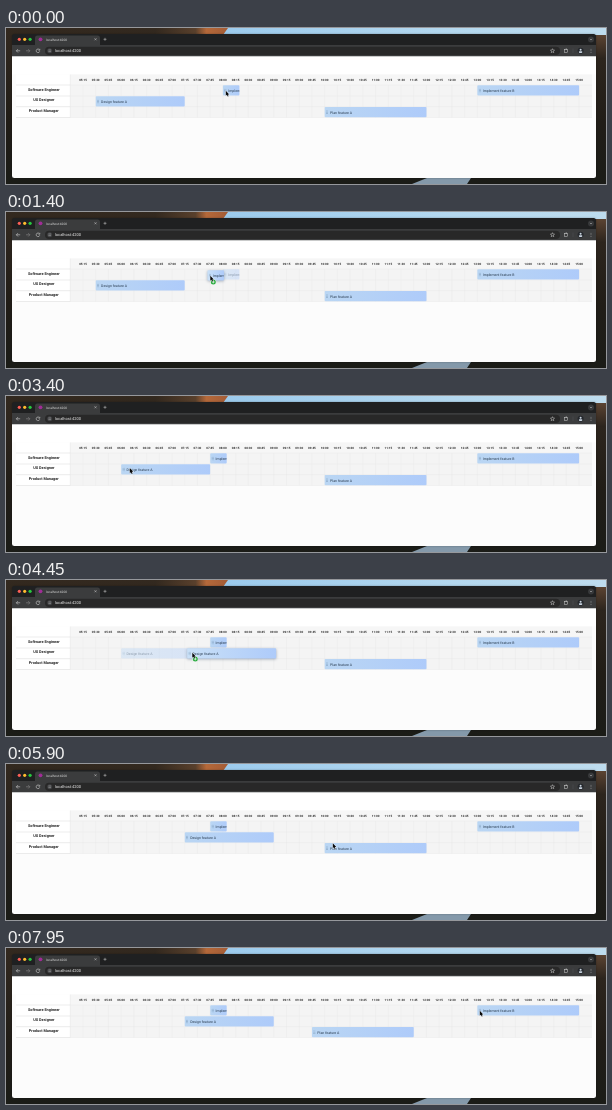
An HTML page with a canvas that plays this animation: 600 by 156 pixels, repeating every 8000 ms.

```html
<!DOCTYPE html>
<html lang="en">
<head>
<meta charset="utf-8">
<title>Schedule board</title>
<style>
html, body { margin: 0; width: 100%; height: 100%; overflow: hidden; background: #1c1a1c; }
canvas { display: block; width: 600px; height: 156px; }
</style>
</head>
<body>
<canvas id="stage"></canvas>
<script>
const W = 600, H = 156, LOOP = 8000;
const canvas = document.getElementById('stage');
const dpr = window.devicePixelRatio || 1;
canvas.width = W * dpr;
canvas.height = H * dpr;
const ctx = canvas.getContext('2d');
ctx.textRendering = 'geometricPrecision';

const STEP = 12.72, FIRST = 77;       // one column is a quarter of an hour
const ROWS = [57, 68, 78.7, 89.5];
const slot = n => FIRST + n * STEP;

// Drags: task, start, end, drop time, old and new slot, travel of the ghost
const DRAGS = [
  { task: 0, from: 650, to: 1400, drop: 1750, a: 11, b: 10, dx: -15.5, dy: 1 },
  { task: 1, from: 2550, to: 3000, drop: 3100, a: 1, b: 3, dx: 25, dy: 0.3 },
  { task: 1, from: 3750, to: 4430, drop: 4750, a: 3, b: 8, dx: 66, dy: 0 },
  { task: 2, from: 6050, to: 6450, drop: 6550, a: 19, b: 18, dx: -13, dy: 0 }
];
const TASKS = [
  { text: 'Implement feature A', row: 0, at: 11, w: 16.5 },
  { text: 'Design feature A', row: 1, at: 1, w: 89 },
  { text: 'Plan feature A', row: 2, at: 19, w: 101.8 },
  { text: 'Implement feature B', row: 0, at: 31, w: 101.8 }
];
// Pointer path: time, x, y
const PATH = [
  [0, 220.5, 65], [650, 220.5, 65], [1400, 205, 66], [1850, 205, 66],
  [2350, 99.5, 74], [2550, 99.5, 74], [3000, 124.5, 74.3], [3450, 124.5, 74.3],
  [3650, 121, 75], [3750, 121, 75], [4430, 187, 75], [4850, 187, 75],
  [5650, 327.5, 81.5], [5900, 327.5, 81.5], [6050, 321, 83], [6450, 308, 83],
  [6950, 308, 83], [7700, 474.5, 65], [8000, 474.5, 65]
];

const ease = p => p * p * (3 - 2 * p);
const clamp = p => Math.max(0, Math.min(1, p));

function pointer(t) {
  let i = 0;
  while (i < PATH.length - 2 && t >= PATH[i + 1][0]) i++;
  const [t0, x0, y0] = PATH[i], [t1, x1, y1] = PATH[i + 1];
  const p = ease(clamp((t - t0) / (t1 - t0)));
  return [x0 + (x1 - x0) * p, y0 + (y1 - y0) * p];
}

function rect(x, y, w, h, color, r = 0) {
  ctx.fillStyle = color;
  ctx.beginPath();
  ctx.roundRect(x, y, w, h, r);
  ctx.fill();
}

function polygon(points, color) {
  ctx.fillStyle = color;
  ctx.beginPath();
  points.forEach(([x, y]) => ctx.lineTo(x, y));
  ctx.fill();
}

function dot(x, y, r, color) {
  ctx.fillStyle = color;
  ctx.beginPath();
  ctx.arc(x, y, r, 0, 7);
  ctx.fill();
}

function line(points, color, width = 0.6) {
  ctx.strokeStyle = color;
  ctx.lineWidth = width;
  ctx.beginPath();
  points.forEach(([x, y], i) => i ? ctx.lineTo(x, y) : ctx.moveTo(x, y));
  ctx.stroke();
}

function label(text, x, y, size, color, weight = 400, align = 'left') {
  ctx.font = `${weight} ${size}px Roboto, sans-serif`;
  ctx.fillStyle = color;
  ctx.textAlign = align;
  ctx.textBaseline = 'alphabetic';
  ctx.fillText(text, x, y);
}

function gradient(x0, y0, x1, y1, stops) {
  const g = ctx.createLinearGradient(x0, y0, x1, y1);
  stops.forEach(([p, c]) => g.addColorStop(p, c));
  return g;
}

// Dark cliffs below a pale sky, with a patch of water at the bottom
function desktop() {
  rect(0, 0, W, H, gradient(0, 0, 0, H, [
    [0, '#33291f'], [0.25, '#2b241d'], [0.6, '#211d17'], [1, '#1b1c17']
  ]));
  rect(150, 0, 72, 7, gradient(150, 0, 222, 0, [
    [0, '#33291f'], [0.55, '#59402c'], [0.7, '#b5693a'], [1, '#a35c36']
  ]));
  polygon([[217, 7], [222, 0], [600, 0], [600, 7]], gradient(217, 0, 600, 0, [
    [0, '#9ccbed'], [0.6, '#b4d8ef'], [1, '#bedcee']
  ]));
  rect(590, 7, 10, 24, gradient(0, 7, 0, 31, [[0, '#5b4332'], [1, '#2b241d']]));
  polygon([[406, 156], [421, 150], [465, 150], [461, 156]], '#8499aa');
}

function browser() {
  ctx.save();
  ctx.shadowColor = 'rgba(0,0,0,.35)';
  ctx.shadowBlur = 2 * dpr;
  rect(6, 6, 584, 144, '#1f2021', 2.5);
  ctx.restore();
  rect(29, 7.5, 65, 12, '#3b3c3d', 2.5);
  rect(6, 17, 584, 11.5, '#3b3c3d');
  ['#fe5f57', '#febc2e', '#28c840'].forEach((c, i) => dot(13.3 + i * 5.4, 11.3, 1.6, c));
  dot(34.5, 11.3, 1.9, '#a02c96');
  label('localhost:4200', 40, 12.5, 3.2, '#e3e3e3');
  const pale = '#d0d0d0';
  line([[88.5, 10.3], [90.5, 12.3]], pale, 0.5);
  line([[90.5, 10.3], [88.5, 12.3]], pale, 0.5);
  line([[97.5, 11.3], [100.5, 11.3]], pale, 0.5);
  line([[99, 9.8], [99, 12.8]], pale, 0.5);
  dot(585, 11.4, 3, '#37383a');
  line([[583.9, 10.9], [585, 12], [586.1, 10.9]], pale, 0.5);

  rect(39, 18.8, 515, 8.2, '#282828', 4.1);
  line([[14.2, 22.8], [10.4, 22.8]], pale);
  line([[12, 21.1], [10.3, 22.8], [12, 24.5]], pale);
  line([[20, 22.8], [23.8, 22.8]], '#858585');
  line([[22.2, 21.1], [23.9, 22.8], [22.2, 24.5]], '#858585');
  ctx.strokeStyle = pale;
  ctx.lineWidth = 0.6;
  ctx.beginPath();
  ctx.arc(32, 22.8, 1.8, 0.3, 5.5);
  ctx.stroke();
  line([[33.8, 20.8], [33.8, 22.2], [32.4, 22.2]], pale);
  dot(43.7, 22.8, 2.5, '#414244');
  line([[42.4, 22], [45, 22]], pale, 0.4);
  line([[42.4, 23.6], [45, 23.6]], pale, 0.4);
  label('localhost:4200', 48.8, 24.3, 4, '#eeeeee');

  const star = [];
  for (let i = 0; i <= 10; i++) {
    const a = i * Math.PI / 5 - Math.PI / 2, r = i % 2 ? 1 : 2.2;
    star.push([546.5 + r * Math.cos(a), 22.9 + r * Math.sin(a)]);
  }
  line(star, pale, 0.5);
  ctx.strokeRect(558.4, 21.5, 3, 3);
  dot(560.2, 21.1, 0.7, pale);
  line([[567, 20.5], [567, 25]], '#58595b', 0.4);
  dot(574.6, 22.8, 3, '#24272c');
  dot(574.6, 21.8, 1, '#c9d4df');
  rect(572.8, 23.2, 3.6, 1.7, '#c9d4df', 0.8);
  [-1.6, 0, 1.6].forEach(d => dot(585, 22.8 + d, 0.42, pale));

  rect(6, 28.5, 584, 121.5, '#fcfcfc', [0, 0, 2.5, 2.5]);
  rect(6, 28.5, 584, 18, '#ffffff');
}

function board() {
  rect(10, 46.5, 576, 43, '#ffffff');
  rect(64.3, 46.5, 521.7, 10.5, '#f6f6f6');
  rect(64.3, 57, 521.7, 32.5, '#f4f4f4');
  for (let n = 0; n < 40; n++) {
    const minutes = 315 + n * 15;
    const time = [Math.floor(minutes / 60), minutes % 60].map(v => String(v).padStart(2, '0')).join(':');
    label(time, slot(n), 52.7, 3, '#2b2b2b', 700, 'center');
    line([[slot(n), 57], [slot(n), 89.5]], '#e7e7e7', 0.4);
  }
  ROWS.forEach(y => {
    line([[10, y], [64.3, y]], '#d9d9d9', 0.5);
    line([[64.3, y], [586, y]], '#e6e6e6', 0.4);
  });
  line([[64.3, 46.5], [64.3, 89.5]], '#e2e2e2', 0.5);
  ['Software Engineer', 'UX Designer', 'Product Manager'].forEach((name, i) =>
    label(name, 37.8, [62.7, 73.3, 84.2][i], 3.85, '#222222', 700, 'center'));
}

function bar(task, x, y, alpha, lifted) {
  const h = 10.3;
  ctx.save();
  ctx.globalAlpha = alpha;
  if (lifted) {
    ctx.shadowColor = 'rgba(40,60,90,.4)';
    ctx.shadowBlur = 3 * dpr;
    ctx.shadowOffsetY = 0.8 * dpr;
  }
  const start = lifted ? '#c9e0f7' : '#bad6f3';
  rect(x, y, task.w, h, gradient(x, 0, x + task.w, 0, [[0, start], [1, '#aecbfa']]), 0.9);
  ctx.shadowColor = 'transparent';
  ctx.beginPath();
  ctx.rect(x, y, task.w, h);
  ctx.clip();
  for (let i = 0; i < 6; i++) dot(x + 1.9 + (i % 2) * 1.1, y + 4 + (i >> 1) * 1.3, 0.38, '#6f8fae');
  label(task.text, x + 5.4, y + 6.9, 3.53, '#27394d');
  ctx.restore();
}

function cursor(x, y, adding) {
  if (adding) {
    dot(x + 2.3, y + 4, 2.8, '#ffffff');
    dot(x + 2.3, y + 4, 2.5, '#25a83a');
    line([[x + 0.9, y + 4], [x + 3.7, y + 4]], '#ffffff', 0.7);
    line([[x + 2.3, y + 2.6], [x + 2.3, y + 5.4]], '#ffffff', 0.7);
  }
  ctx.save();
  ctx.translate(x - 0.7, y - 2.2);
  ctx.scale(1.12, 1.12);
  ctx.beginPath();
  [[0, 0], [0, 4.5], [1, 3.6], [1.7, 5.2], [2.5, 4.8], [1.8, 3.3], [3.1, 3.2]]
    .forEach(([px, py]) => ctx.lineTo(px, py));
  ctx.closePath();
  ctx.strokeStyle = 'rgba(255,255,255,.85)';
  ctx.lineWidth = 0.7;
  ctx.stroke();
  ctx.fillStyle = '#080808';
  ctx.fill();
  ctx.restore();
}

function draw(t) {
  ctx.setTransform(dpr, 0, 0, dpr, 0, 0);
  desktop();
  browser();
  board();
  const active = DRAGS.find(d => t >= d.from && t < d.drop);
  TASKS.forEach((task, i) => {
    const done = DRAGS.filter(d => d.task === i && t >= d.drop).pop();
    const held = active && active.task === i;
    bar(task, slot(done ? done.b : task.at), ROWS[task.row] + 0.2, held ? 0.42 : 1, false);
  });
  if (active) {
    const task = TASKS[active.task];
    const p = ease(clamp((t - active.from) / (active.to - active.from)));
    bar(task, slot(active.a) + active.dx * p, ROWS[task.row] + 0.2 + active.dy * p, 1, true);
  }
  cursor(...pointer(t), Boolean(active));
}

function frame(now) {
  draw(now % LOOP);
  requestAnimationFrame(frame);
}
draw(0);
requestAnimationFrame(frame);
</script>
</body>
</html>
```
